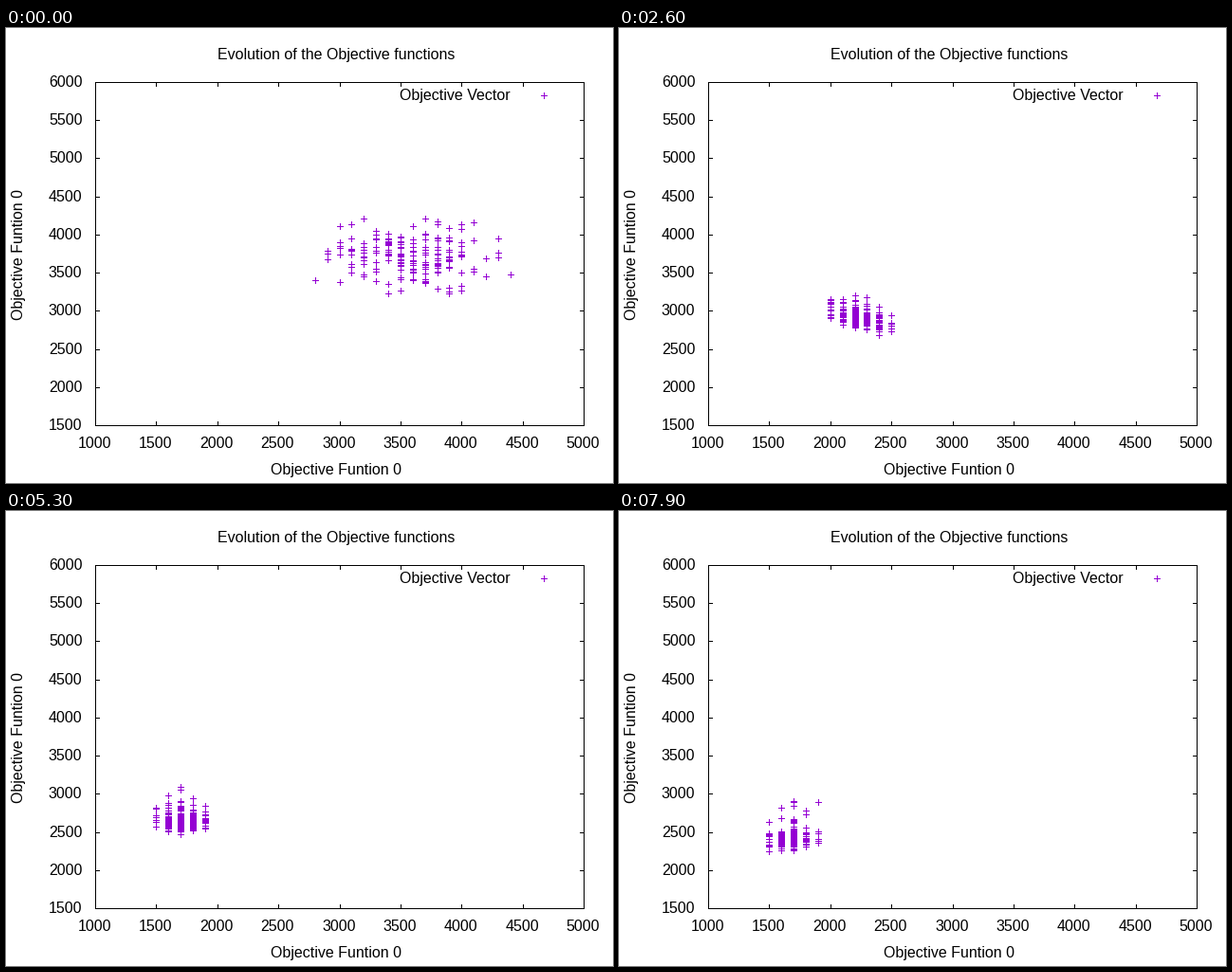
A matplotlib script for the animation above (8 s loop, 640 px wide and 480 px high).

```python
import numpy as np
import matplotlib.pyplot as plt
from matplotlib.animation import FuncAnimation
from matplotlib.collections import LineCollection

W, H, DPI = 640, 480, 100
FRAMES, INTERVAL = 80, 100
PX = 72 / DPI
LEFT, RIGHT, TOP, BOTTOM = 94, 609, 57, 419
XMIN, XMAX, YMIN, YMAX = 1000, 5000, 1500, 6000
PURPLE = "#9400D3"

SIZE, LIFE = 200, 3
TAIL_SHARE = 0.2

# Key points of the population's drift towards the lower left.
GEN = [0, 8, 13, 25, 34, 52, 64, 78]
X_MEAN = [3590, 2820, 2600, 2230, 2080, 1710, 1660, 1655]
X_STD = [330, 150, 125, 110, 115, 105, 95, 85]
Y_MEAN = [3720, 3240, 3080, 2910, 2785, 2650, 2490, 2385]
Y_STD = [215, 100, 75, 62, 68, 72, 58, 58]
SLOPE = [0, -0.4, -0.7, -0.5, -0.3, 0, 0.25, 0.1]
TAIL = [0, 80, 120, 120, 130, 110, 150, 160]

plt.rcParams["font.family"] = "Liberation Sans"
plt.rcParams["font.size"] = 16 * PX

rng = np.random.default_rng(12)
shape = (FRAMES // LIFE + 2, SIZE)
along = np.clip(rng.normal(size=shape), -2.4, 2.4)
across = np.clip(rng.normal(size=shape), -2.3, 2.3)
above = np.minimum(rng.exponential(size=shape), 3) * (rng.random(shape) < TAIL_SHARE)
phase = rng.integers(0, LIFE, SIZE)


def population(i):
    """Members stay put for LIFE generations, then new ones replace them."""
    brood, age = np.divmod(i + phase, LIFE)
    birth = i - age

    def at_birth(values):
        return np.interp(birth, GEN, values)

    member = brood, np.arange(SIZE)
    dx = along[member] * at_birth(X_STD)
    x = np.maximum(np.round((at_birth(X_MEAN) + dx) / 100) * 100, 1500)
    y = (at_birth(Y_MEAN) + at_birth(SLOPE) * dx
         + across[member] * at_birth(Y_STD) + above[member] * at_birth(TAIL))
    return x, y


def to_pixel(x, y):
    px = LEFT + (x - XMIN) * (RIGHT - LEFT) / (XMAX - XMIN)
    py = BOTTOM - (y - YMIN) * (BOTTOM - TOP) / (YMAX - YMIN)
    return np.floor(px + 0.5), np.floor(py + 0.5)


def crosses(px, py):
    segs = []
    for x, y in zip(px, py):
        segs.append([(x - 3, y + 0.5), (x + 4, y + 0.5)])
        segs.append([(x + 0.5, y - 3), (x + 0.5, y + 4)])
    return segs


def add_lines(segs, color):
    lines = LineCollection(segs, colors=color, linewidths=PX, capstyle="butt")
    lines.set_snap(False)
    return ax.add_collection(lines, autolim=False)


def label(x, y, text, ha="center", **kw):
    # The offset makes up for the side bearing of the first glyph.
    ax.text(x - 0.6, y, text, ha=ha, va="baseline", color="black", **kw)


fig = plt.figure(figsize=(W / DPI, H / DPI), dpi=DPI, facecolor="white")
ax = fig.add_axes([0, 0, 1, 1])
ax.set_xlim(0, W)
ax.set_ylim(H, 0)
ax.axis("off")

border = []
for y in (TOP, BOTTOM):
    border.append([(LEFT, y + 0.5), (RIGHT + 1, y + 0.5)])
for x in (LEFT, RIGHT):
    border.append([(x + 0.5, TOP), (x + 0.5, BOTTOM + 1)])
for v in range(XMIN, XMAX + 1, 500):
    x, _ = to_pixel(v, YMIN)
    border.append([(x + 0.5, TOP), (x + 0.5, TOP + 5)])
    border.append([(x + 0.5, BOTTOM - 4), (x + 0.5, BOTTOM + 1)])
    label(x, 443, str(v))
for v in range(YMIN, YMAX + 1, 500):
    _, y = to_pixel(XMIN, v)
    border.append([(LEFT, y + 0.5), (LEFT + 5, y + 0.5)])
    border.append([(RIGHT - 4, y + 0.5), (RIGHT + 1, y + 0.5)])
    label(81, y + 5, str(v), ha="right")
add_lines(border, "black")

label(349, 33, "Evolution of the Objective functions")
label(349, 471, "Objective Funtion 0")
label(19, 239.5, "Objective Funtion 0", rotation=90, rotation_mode="anchor")
label(532.5, 76, "Objective Vector", ha="right")
add_lines(crosses([567], [71]), PURPLE)
cloud = add_lines([], PURPLE)


def update(i):
    cloud.set_segments(crosses(*to_pixel(*population(i))))
    return (cloud,)


anim = FuncAnimation(fig, update, frames=FRAMES, interval=INTERVAL,
                     repeat=True, blit=False)
plt.show()
```
